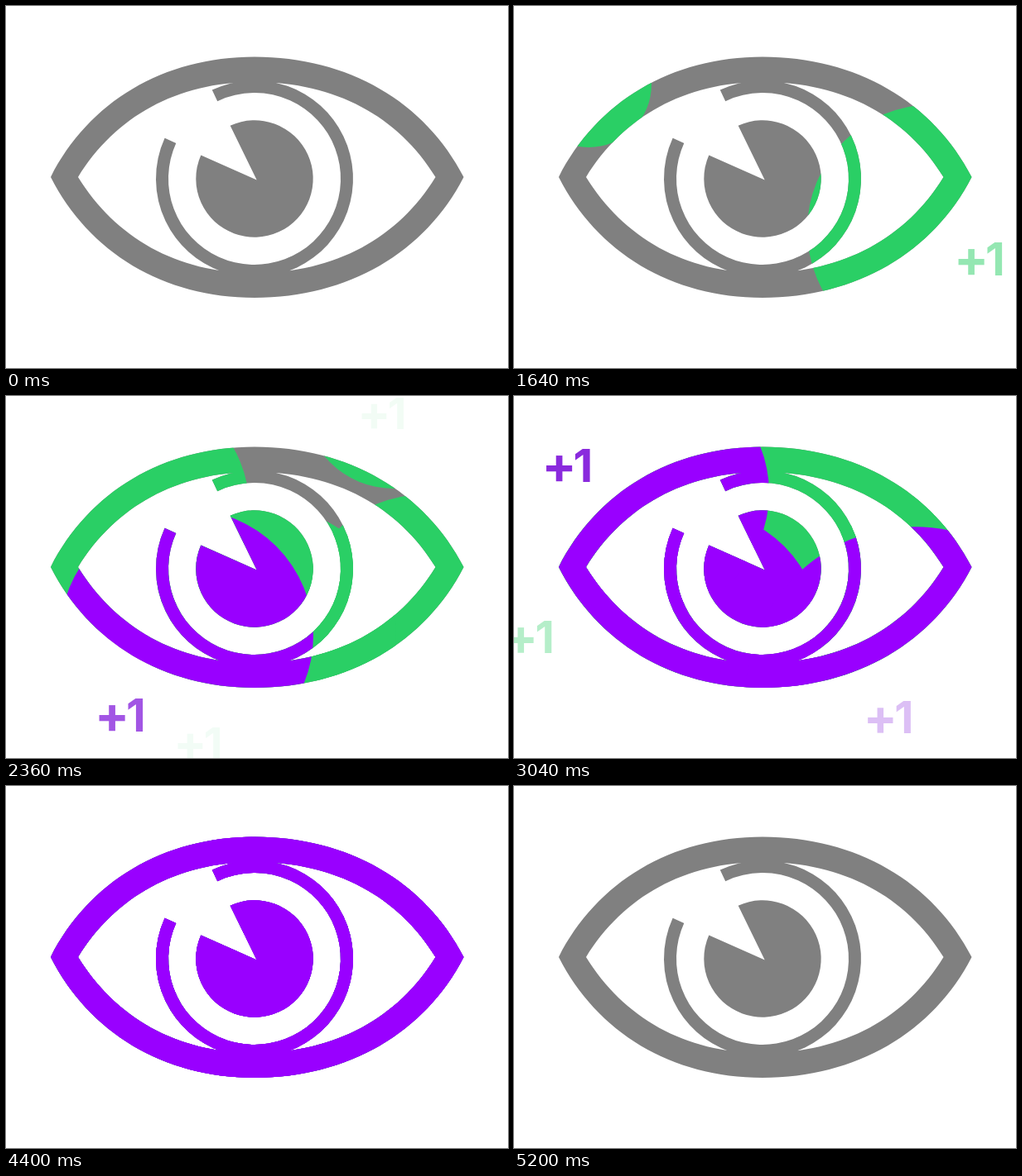
These frames come from a looping animation (606x438 px, 7.56 s). An HTML page with a canvas:

```html
<!DOCTYPE html>
<html lang="en">
<head>
<meta charset="utf-8">
<title>Eye</title>
<style>
  html, body { margin: 0; width: 100%; height: 100%; overflow: hidden; background: #fff; }
  canvas { display: block; }
</style>
</head>
<body>
<canvas id="stage" width="606" height="438"></canvas>
<script>
const ctx = document.getElementById('stage').getContext('2d');
const LOOP = 7560, STEP = 40, GROW = 240;
const GRAY = '#808080', GREEN = '#2acf65', PURPLE = '#9900ff', PURPLE_TEXT = '#7300d6';

// from/to: ripple centre; label: centre x and baseline of the "+1"
const ripples = [
  { start: 1400, from: [506.5, 270.5], to: [506, 271], radius: 152, label: [563, 326] },
  { start: 1520, from: [38, 53], to: [142, 137], radius: 152, label: [76, 74] },
  { start: 1812, from: [320, 287], radius: 151, label: [233, 439] },
  { start: 2225, from: [467, 5], radius: 190, label: [455, 40] },
  { start: 2550, from: [60, 270], radius: 151, label: [19, 311] },
  { start: 2080, from: [218, 290], radius: 153, label: [139, 406], purple: true },
  { start: 2720, from: [157, 117], radius: 151, label: [65.5, 104], purple: true },
  { start: 2860, from: [484, 363], radius: 273, label: [453, 408], purple: true },
  { start: 3080, from: [480, 40], radius: 235, label: [484, 62], purple: true, size: 74, life: 800 }
];

const clamp = v => Math.max(0, Math.min(1, v));
const ramp = (t, start, length) => clamp((t - start) / length);
const mix = (a, b, k) => a + (b - a) * k;
const rad = degrees => degrees * Math.PI / 180;

function buildEye() {
  const eye = new Path2D();
  // Lids: the inner outline winds the other way and cuts the opening
  eye.moveTo(54, 207);
  eye.bezierCurveTo(100, 116, 190, 61.5, 300, 61.5);
  eye.bezierCurveTo(413, 61.5, 506, 116, 552.5, 207);
  eye.bezierCurveTo(506, 298, 413, 353, 300, 353);
  eye.bezierCurveTo(190, 353, 100, 298, 54, 207);
  eye.closePath();
  eye.moveTo(87, 207);
  eye.bezierCurveTo(132, 280, 206, 323, 300, 323);
  eye.bezierCurveTo(398, 323, 474, 280, 518.5, 207);
  eye.bezierCurveTo(474, 134, 398, 92, 300, 92);
  eye.bezierCurveTo(206, 92, 132, 134, 87, 207);
  eye.closePath();
  // Iris ring
  const a = rad(-115.5), b = rad(204.4);
  eye.moveTo(300 + 119 * Math.cos(a), 209 + 119 * Math.sin(a));
  eye.arc(300, 209, 119, a, b);
  eye.arc(300, 209, 104, b, a, true);
  eye.closePath();
  // Pupil
  eye.moveTo(302.7, 210.4);
  eye.arc(300, 209, 70.7, rad(-114.5), rad(203.8));
  eye.closePath();
  return eye;
}
const eye = buildEye();

function drawRipple(r, t, first) {
  const k = ramp(t, r.start, GROW);
  const dot = first && t >= 880 ? 6.5 : 0;
  const radius = Math.max(dot, r.radius * k);
  if (!radius) return;
  const to = r.to || r.from;
  ctx.fillStyle = r.purple ? PURPLE : GREEN;
  ctx.beginPath();
  ctx.arc(mix(r.from[0], to[0], k), mix(r.from[1], to[1], k), radius, 0, Math.PI * 2);
  ctx.fill();
}

// Places a glyph by its ink: left (side 0) or right (side 1) edge at x, bottom at y
function drawGlyph(glyph, size, x, y, side) {
  ctx.font = `700 ${size}px Inter, sans-serif`;
  const box = ctx.measureText(glyph);
  const edge = side ? box.actualBoundingBoxRight : -box.actualBoundingBoxLeft;
  ctx.fillText(glyph, x - edge, y - box.actualBoundingBoxDescent);
}

function drawLabel(r, t) {
  const age = t - r.start, life = r.life || 560;
  const alpha = Math.min(ramp(age, 120, 240), 1 - ramp(age, life - 200, 200));
  if (alpha <= 0) return;
  const size = (r.size || 55) * (0.95 + 0.05 * clamp(alpha * 2));
  const [x, y] = r.label;
  ctx.globalAlpha = alpha;
  ctx.fillStyle = r.purple ? PURPLE_TEXT : GREEN;
  drawGlyph('+', size * 1.13, x - size * 0.49, y, 0);
  drawGlyph('1', size, x + size * 0.49, y, 1);
  ctx.globalAlpha = 1;
}

function fillEye(color, alpha) {
  ctx.globalAlpha = alpha;
  ctx.fillStyle = color;
  ctx.fill(eye);
  ctx.globalAlpha = 1;
}

function draw(t) {
  ctx.fillStyle = '#fff';
  ctx.fillRect(0, 0, 606, 438);
  fillEye(GRAY, 1);
  if (t < 5200) {
    ctx.save();
    ctx.clip(eye);
    ripples.forEach((r, i) => drawRipple(r, t, i === 0));
    ctx.restore();
    fillEye(PURPLE, ramp(t, 4000, 400));
    fillEye(GRAY, ramp(t, 4800, 400));
  }
  ripples.forEach(r => drawLabel(r, t));
}

const origin = performance.now();
function tick() {
  const t = (performance.now() - origin) % LOOP;
  draw(Math.floor(t / STEP) * STEP);
  requestAnimationFrame(tick);
}
tick();
</script>
</body>
</html>
```
